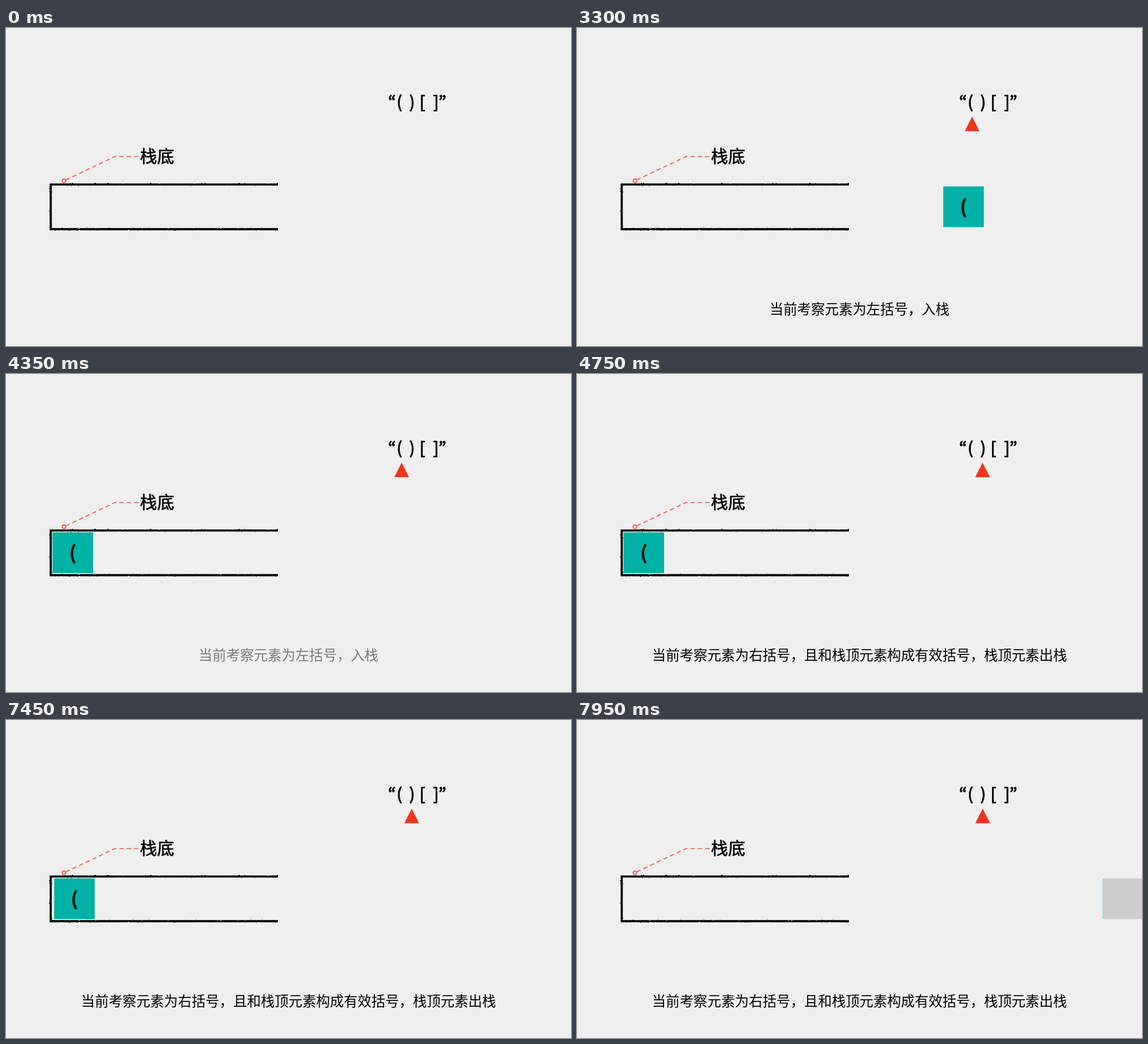
Recreate the animation shown at these times as an HTML page. Size 960 px wide and 540 px high, loop 8000 ms.

```html
<!DOCTYPE html>
<html lang="zh-CN">
<head>
<meta charset="utf-8">
<title>括号匹配</title>
<style>
html, body { margin: 0; width: 100%; height: 100%; overflow: hidden; background: #efefef; }
svg { display: block; width: 960px; height: 540px; }
text { font-family: "Noto Sans CJK SC", "Noto Sans CJK", sans-serif; fill: #000; }
.medium { stroke: #000; stroke-width: .6px; }
.bracket { font-family: "Noto Sans CJK KR", "Noto Sans CJK SC", sans-serif; text-anchor: middle; stroke: #000; stroke-width: 1px; }
.caption { font-size: 23.5px; text-anchor: middle; }

.pointer, .caption, .shown, .block, .trail { animation: 8s linear infinite; }
.pointer { animation-name: point; }
.push { animation-name: push; }
.pop { animation-name: pop; }
.shown { animation-name: shown; }
.block { animation-name: slide; }
.trail { animation-name: trail; }

@keyframes point {
  0%, .624% { opacity: 0; }
  .625% { opacity: 1; }
  53.375% { opacity: 1; transform: none; animation-timing-function: ease-in-out; }
  59.875%, 100% { opacity: 1; transform: translateX(18px); }
}
@keyframes push {
  0%, 13.749% { opacity: 0; }
  13.75%, 53.75% { opacity: 1; }
  55%, 100% { opacity: 0; }
}
@keyframes pop {
  0%, 55% { opacity: 0; }
  58.125%, 100% { opacity: 1; }
}
@keyframes shown {
  0%, 39.999% { opacity: 0; }
  40%, 99.374% { opacity: 1; }
  99.375%, 100% { opacity: 0; }
}
@keyframes slide {
  0% { transform: translateX(809px); }
  40% { transform: translateX(809px); animation-timing-function: cubic-bezier(.333, .667, .667, 1); }
  47% { transform: none; }
  92.52% { transform: none; animation-timing-function: cubic-bezier(.333, 0, .667, .14); }
  98.75% { transform: translateX(591px); }
  99.375%, 100% { transform: translateX(814px); }
}
@keyframes trail {
  0%, 99.374% { opacity: 0; }
  99.375%, 100% { opacity: 1; }
}
</style>
</head>
<body>
<svg viewBox="0 0 960 540">
  <defs>
    <filter id="chalk" filterUnits="userSpaceOnUse" x="60" y="250" width="420" height="110" color-interpolation-filters="sRGB">
      <feTurbulence type="fractalNoise" baseFrequency=".4" numOctaves="1" seed="4"/>
      <feDisplacementMap in="SourceGraphic" scale="2.4" xChannelSelector="R" yChannelSelector="G"/>
    </filter>
  </defs>
  <rect width="960" height="540" fill="#efefef"/>

  <g fill="none" stroke="#f0624e" stroke-width="1.8">
    <circle cx="98.5" cy="259.5" r="3"/>
    <path d="M101.5 258 L185 218.3 H227" stroke-dasharray="7.5 5"/>
  </g>
  <text class="medium" x="227.6" y="229.3" font-size="29.1">栈底</text>
  <text class="bracket" x="656 668.6 690 707.5 730.5 741.5" y="135.7" font-size="28">“()[]”</text>

  <path class="pointer" d="M671.3 150.5 L683.8 175.2 H658.8 Z" fill="#f2331e"/>

  <g class="shown">
    <g class="block">
      <rect x="79" y="269" width="69" height="69" fill="#00b1a5"/>
      <text class="bracket" x="113.3" y="315.3" font-size="31" style="stroke-width:1.7px">(</text>
    </g>
  </g>
  <g class="trail">
    <rect x="893" y="269" width="67" height="69" fill="#cdcdcd"/>
    <rect x="893" y="269" width="1" height="69" fill="#8fe0dc"/>
  </g>

  <path d="M462 265.7 H76 V341.6 H462" fill="none" stroke="#000" stroke-width="3.6" filter="url(#chalk)"/>

  <text class="caption push" x="480" y="486.4">当前考察元素为左括号，入栈</text>
  <text class="caption pop" x="480" y="486.4">当前考察元素为右括号，且和栈顶元素构成有效括号，栈顶元素出栈</text>
</svg>
</body>
</html>
```
